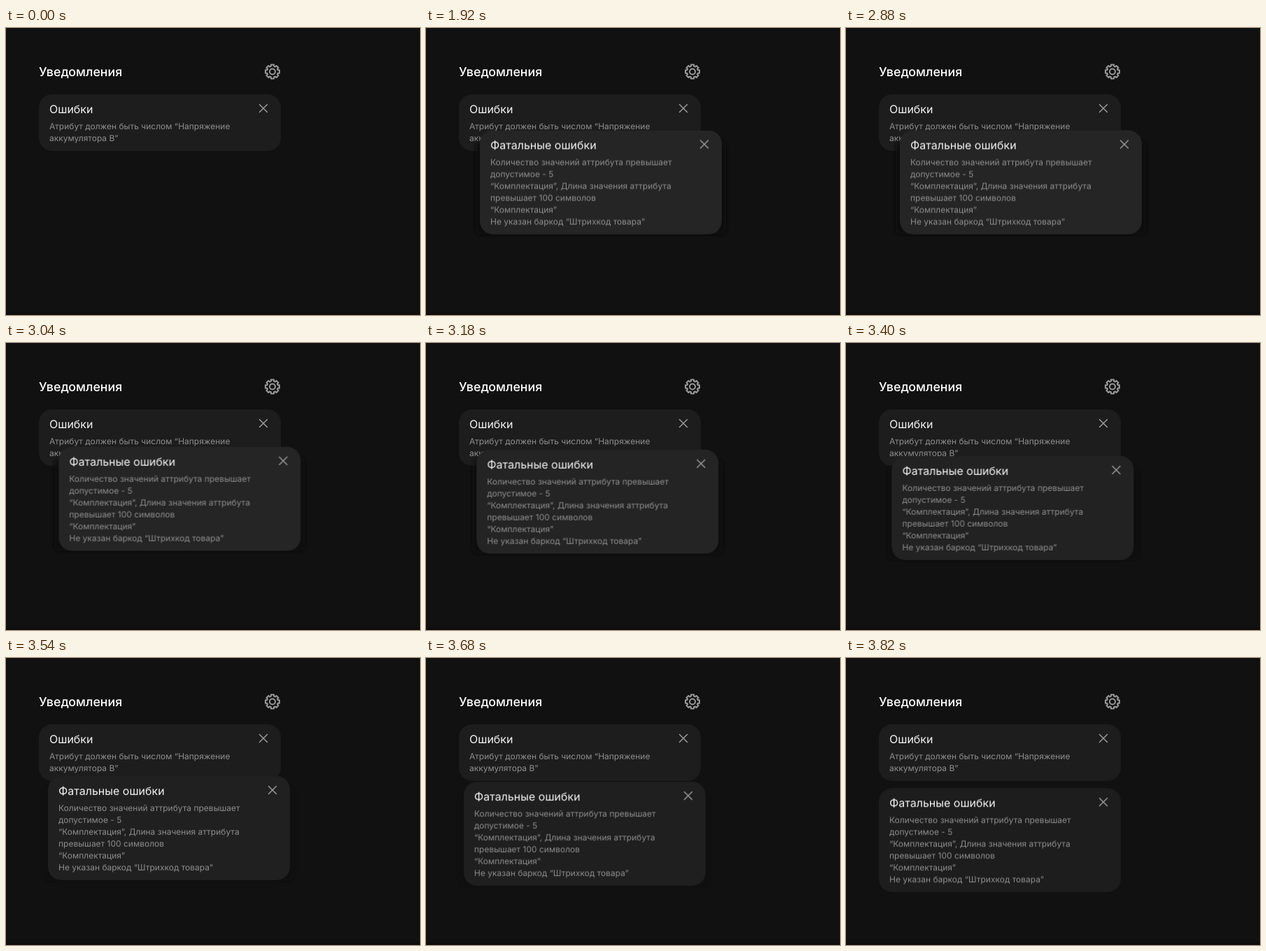
These frames come from a looping animation (592 by 411 pixels, 4620 ms). An HTML page:

```html
<!DOCTYPE html>
<html lang="ru">
<head>
<meta charset="utf-8">
<title>Уведомления</title>
<style>
  html, body { margin: 0; width: 100%; height: 100%; overflow: hidden; background: #111; }
  svg { display: block; width: 592px; height: 411px; }
  text { font-family: Inter, "Open Sans", sans-serif; white-space: pre; text-rendering: geometricPrecision; }
  .heading { font-size: 17.8px; font-weight: 550; fill: #fff; }
  .title { font-size: 16px; fill: #f4f4f4; }
  .line { font-size: 12px; fill: #8e8e8e; }
  .icon { fill: none; stroke: #999; stroke-width: 2; stroke-linejoin: round; }
  .cross { stroke-width: 1.5; stroke-linecap: round; }
  .box { fill: #1d1d1d; }
  .shadow { fill: #101010; filter: url(#soft); }
</style>
</head>
<body>
<svg id="stage" viewBox="0 0 592 411">
  <defs>
    <filter id="soft" x="-10%" y="-10%" width="120%" height="120%">
      <feGaussianBlur stdDeviation="2.5"/>
    </filter>
  </defs>
  <rect y="408" width="592" height="3" fill="#100c0d"/>
  <text class="heading" x="47" y="69">Уведомления</text>
</svg>
<script>
const LOOP = 4620, SHOW = 1920, MOVE = 2860, REST = 3820;
const WIDTH = 346;
const stage = document.getElementById('stage');

function add(parent, tag, attrs, text) {
  const el = document.createElementNS('http://www.w3.org/2000/svg', tag);
  for (const key in attrs) el.setAttribute(key, attrs[key]);
  if (text) el.textContent = text;
  parent.appendChild(el);
  return el;
}

function gear(cx, cy) {
  const teeth = 8, points = [];
  const corners = [[-0.27, 8], [-0.21, 10.2], [0.21, 10.2], [0.27, 8]];
  for (let i = 0; i < teeth; i++) {
    for (const [turn, r] of corners) {
      const a = i * 2 * Math.PI / teeth + turn;
      points.push((r * Math.sin(a)).toFixed(2) + ',' + (-r * Math.cos(a)).toFixed(2));
    }
  }
  const g = add(stage, 'g', { class: 'icon', transform: `translate(${cx} ${cy})` });
  add(g, 'polygon', { points: points.join(' ') });
  add(g, 'circle', { r: 4 });
}

function card(height, title, lines) {
  const g = add(stage, 'g', {});
  const shadow = add(g, 'rect', {
    class: 'shadow', x: -6, y: 15, width: WIDTH + 12, height: height - 15, rx: 8, opacity: 0
  });
  const box = add(g, 'rect', { class: 'box', width: WIDTH, height, rx: 19 });
  add(g, 'text', { class: 'title', x: 15, y: 27 }, title);
  lines.forEach((line, i) => add(g, 'text', { class: 'line', x: 15, y: 50 + 17 * i }, line));
  add(g, 'path', { class: 'icon cross', d: 'M315.5 14.5l11 11m0-11l-11 11' });
  return { g, shadow, box };
}

// Holds one state, then eases into the other until the loop restarts.
function settle(el, from, to) {
  el.animate([
    { ...from, offset: 0 },
    { ...from, offset: MOVE / LOOP, easing: 'ease-in' },
    { ...to, offset: REST / LOOP },
    { ...to, offset: 1 }
  ], { duration: LOOP, iterations: Infinity });
}

gear(381, 62.5);

const first = card(81, 'Ошибки', [
  'Атрибут должен быть числом “Напряжение',
  'аккумулятора В”'
]);
first.g.style.transform = 'translate(47px, 95px)';

const second = card(149, 'Фатальные ошибки', [
  'Количество значений аттрибута превышает',
  'допустимое - 5',
  '“Комплектация”, Длина значения аттрибута',
  'превышает 100 символов',
  '“Комплектация”',
  'Не указан баркод “Штрихкод товара”'
]);

settle(second.g, { transform: 'translate(77px, 146.5px)' }, { transform: 'translate(47px, 186.3px)' });
settle(second.box, { fill: '#252525' }, { fill: '#1d1d1d' });
settle(second.shadow, { opacity: 0.9 }, { opacity: 0 });

second.g.animate([
  { opacity: 0, offset: 0, easing: 'step-end' },
  { opacity: 1, offset: SHOW / LOOP },
  { opacity: 1, offset: 1 }
], { duration: LOOP, iterations: Infinity });
</script>
</body>
</html>
```
